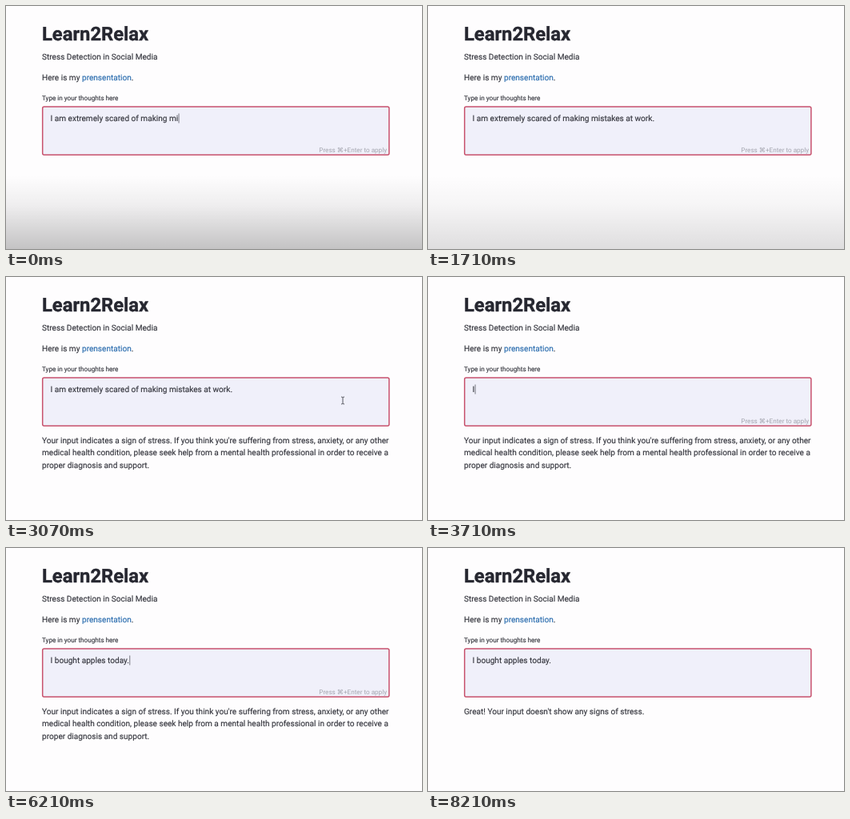
Write an HTML page that moves like this. It is 520 px wide and 304 px high and loops after 8500 ms.

```html
<!DOCTYPE html>
<html lang="en">
<head>
<meta charset="utf-8">
<title>Stress detection demo</title>
<style>
  html, body { margin: 0; width: 100%; height: 100%; overflow: hidden; background: #fefdfe; }
  svg { display: block; }
  text { font: 10.08px Roboto, sans-serif; fill: #34353d; stroke: #34353d; stroke-width: .15px; white-space: pre; text-rendering: geometricPrecision; }
  .title { font-size: 23.75px; font-weight: 700; fill: #262730; stroke: #262730; stroke-width: .4px; }
  .label { font-size: 8.15px; }
  .hint { font-size: 8.15px; fill: #a3a4ae; stroke: none; text-anchor: end; }
  .link { fill: #2a6cae; stroke: #2a6cae; }
</style>
</head>
<body>
<svg width="520" height="304" viewBox="0 0 520 304">
  <defs>
    <linearGradient id="shade" x1="0" y1="0" x2="0" y2="1">
      <stop offset="0" stop-opacity="0"/>
      <stop offset=".4" stop-opacity=".06"/>
      <stop offset="1" stop-opacity=".23"/>
    </linearGradient>
  </defs>
  <text class="title" x="45" y="42.7">Learn2Relax</text>
  <text x="45" y="67">Stress Detection in Social Media</text>
  <text x="45" y="92.6">Here is my <tspan class="link">prensentation</tspan>.</text>
  <text class="label" x="45" y="118">Type in your thoughts here</text>
  <rect x="45.7" y="126" width="433.2" height="60.2" rx="2" fill="#f0f0fa" stroke="#c8526d" stroke-width="1.5"/>
  <text id="input" x="55.5" y="144"></text>
  <rect id="caret" y="134.5" width="1" height="12" fill="#75767f"/>
  <text id="hint" class="hint" x="476" y="183.3">Press ⌘+Enter to apply</text>
  <g id="stressed">
    <text x="45" y="207.8">Your input indicates a sign of stress. If you think you're suffering from stress, anxiety, or any other</text>
    <text x="45" y="223.4">medical health condition, please seek help from a mental health professional in order to receive a</text>
    <text x="45" y="239">proper diagnosis and support.</text>
  </g>
  <text id="calm" x="45" y="207.8">Great! Your input doesn't show any signs of stress.</text>
  <path id="mouse" d="M-2-4.5Q0-4.5 0-3.5Q0-4.5 2-4.5M0-3.5V3.5M-2 4.5Q0 4.5 0 3.5Q0 4.5 2 4.5" fill="none" stroke="#55565e"/>
  <rect id="overlay" y="212" width="520" height="92" fill="url(#shade)"/>
</svg>
<script>
const LOOP = 8500, SENT = 2290, CLEARED = 3430, RESENT = 6790;
const [input, caret, hint, stressed, calm, mouse, overlay] =
  ["input", "caret", "hint", "stressed", "calm", "mouse", "overlay"].map(id => document.getElementById(id));

const clamp = v => Math.min(1, Math.max(0, v));
const show = (el, on) => el.setAttribute("visibility", on ? "visible" : "hidden");

// Part of a string typed between the first and last keystroke times
function typed(text, first, last, t) {
  if (t < first) return "";
  return text.slice(0, 1 + Math.floor(clamp((t - first) / (last - first)) * (text.length - 1) + 1e-6));
}

function thought(t) {
  if (t < CLEARED) {
    return "I am extremely scared of making mi" +
      typed("stakes at wor", 70, 1070, t) + typed("k.", 1210, 1280, t);
  }
  return typed("I boug", 3710, 4640, t) + typed("ht", 4790, 4860, t) +
    typed(" apples to", 4930, 5790, t) + typed("day.", 5860, 6210, t);
}

function caretOn(t) {
  return t < 1700 || (t >= 2210 && t < SENT) || (t >= CLEARED && t < 6500);
}

function draw(t) {
  input.textContent = thought(t);
  caret.setAttribute("x", 55.8 + input.getComputedTextLength());
  show(caret, caretOn(t));
  show(hint, t < SENT || (t >= CLEARED && t < RESENT));
  show(stressed, t >= SENT && t < RESENT);
  show(calm, t >= RESENT);

  const left = (1 - clamp((t - 2570) / 430)) ** 2;
  mouse.setAttribute("transform", `translate(${421 + 19 * left} ${154.5 + 142 * left})`);
  show(mouse, t >= 2570 && t < CLEARED);

  overlay.setAttribute("opacity", 1 - clamp((t - 1640) / 155));
}

const start = performance.now();
function tick() {
  draw((performance.now() - start) % LOOP);
  requestAnimationFrame(tick);
}
tick();
</script>
</body>
</html>
```
